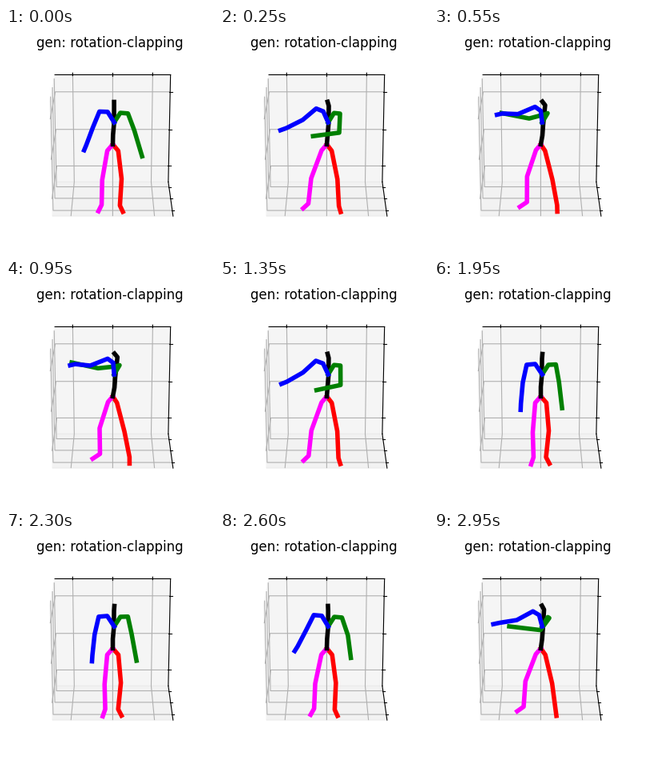
A matplotlib script for the animation above (3 s loop, 260 by 280 pixels).

```python
import numpy as np
import matplotlib.pyplot as plt
from matplotlib.animation import FuncAnimation

W, H, DPI = 260, 280, 100
FRAMES, STEP = 60, 50
CYCLE, PEAK, SPREAD = 2550, 790, 601  # clap timing in ms

PELVIS, CHEST = (133, 145), (134.7, 117.5)


class Limb:
    """Chain of joints blending from rest to clap along an arc."""

    def __init__(self, color, root, rest, clap, arc=0, flare=0):
        self.color, self.root = color, root
        self.rest, self.clap = np.array(rest), np.array(clap)
        self.arc, self.flare = np.array(arc), np.array(flare)

    def pose(self, w):
        early = w / 0.14 * np.exp(1 - w / 0.14)  # outward swing at the start
        joints = (self.rest + w * (self.clap - self.rest)
                  + np.sin(np.pi * w) * self.arc + early * self.flare)
        return np.vstack([self.root, joints]).T


limbs = [
    Limb("red", PELVIS,
         rest=[(140, 153), (143, 188), (139.5, 221), (143.7, 229)],
         clap=[(138.3, 153), (147.5, 189), (153.5, 221), (153.7, 229)],
         arc=[(0, 0), (1, 0), (1.5, 1), (1.5, 0.5)]),
    Limb("magenta", PELVIS,
         rest=[(126, 153), (123, 190), (124, 221), (121, 230)],
         clap=[(127, 152), (116, 185), (116, 217), (107, 223)],
         arc=[(0, 0), (-6, 0), (-10, 0), (-10.5, -1.5)]),
    Limb("black", PELVIS,
         rest=[(133, 133), (134.3, 119), (134.5, 98), (135, 92)],
         clap=[(135, 134), (136, 120), (138.5, 96), (135, 91.5)],
         arc=[(0, 0), (0, 0), (-1, 0), (-1, 0)]),
    Limb("green", CHEST,
         rest=[(142.5, 105.5), (151.8, 105), (155.5, 127), (158.7, 159.5)],
         clap=[(141.5, 106), (137.5, 107.5), (117.5, 112), (83, 105)],
         arc=[(0, 0), (5, 0), (11, 11.5), (-11, 1)],
         flare=[(0, 0), (0, 1), (5, -2), (25, 7)]),
    Limb("blue", CHEST,
         rest=[(126, 104.5), (115.3, 105.5), (110.5, 128), (108.3, 154), (108, 162)],
         clap=[(133, 103), (126, 98), (104.5, 107), (85, 106), (78.5, 107.5)],
         arc=[(-1, 0), (-1, -1.5), (-4.5, -3), (-14, -5), (-18, -7)]),
]


def clap_weight(t):
    gap = (t - PEAK + CYCLE / 2) % CYCLE - CYCLE / 2
    return 1.07 * np.exp(-(abs(gap) / SPREAD) ** 2.75)


fig = plt.figure(figsize=(W / DPI, H / DPI), dpi=DPI, facecolor="white")
fig.text(0.5, 1 - 24.2 / H, "gen: rotation-clapping", fontsize=12,
         family="DejaVu Sans", ha="center", va="baseline")

side = 229.4
room = fig.add_axes([15.6 / W, 17.3 / H, side / W, side / H], projection="3d")
room.view_init(elev=110, azim=-90.001)
room.set(xlim=(-1, 1), ylim=(-1, 1), zlim=(-1, 1))
room.grid(True, color="#d0d0d0")
for axis in (room.xaxis, room.yaxis, room.zaxis):
    axis.set_ticks([-0.692, 0, 0.692])
    axis.set_ticklabels([])

# whole coordinates fall on pixel centres
stage = fig.add_axes([0, 0, 1, 1])
stage.set(xlim=(-0.5, W - 0.5), ylim=(H - 0.5, -0.5))
stage.axis("off")
lines = [stage.plot([], [], color=limb.color, lw=4)[0] for limb in limbs]


def draw(n):
    w = clap_weight(n * STEP)
    for line, limb in zip(lines, limbs):
        line.set_data(*limb.pose(w))
    return lines


anim = FuncAnimation(fig, draw, frames=FRAMES, interval=STEP, repeat=True, repeat_delay=0)
plt.show()
```
